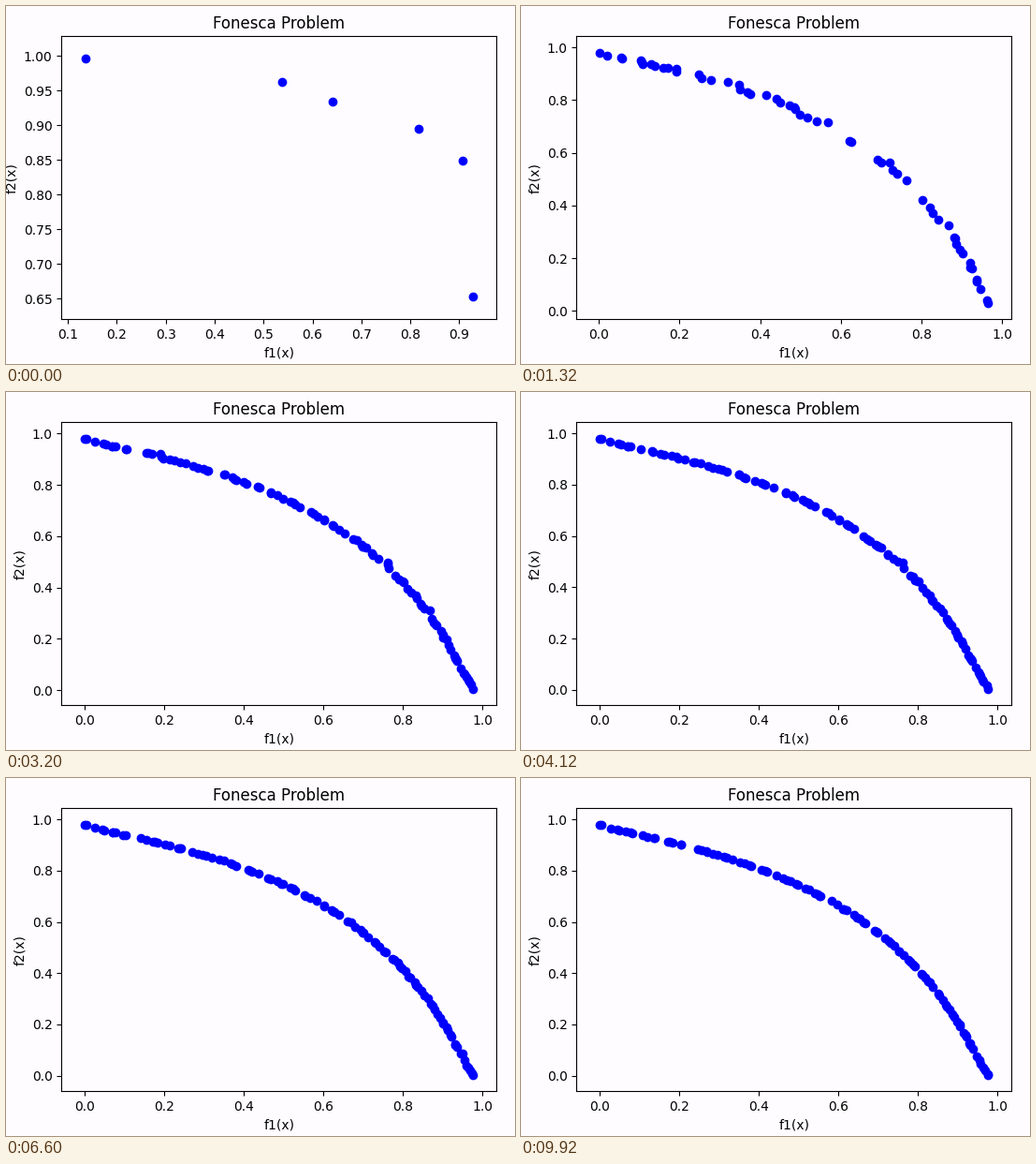
Write a matplotlib script that moves like this. It is 544 by 382 pixels and loops after 10 s.

```python
import numpy as np
import matplotlib.pyplot as plt
from matplotlib.animation import FuncAnimation

W, H, DPI = 544, 382, 100
AX_X, AX_Y, AX_W, AX_H = 59.4, 47.6, 465, 302
TICK_MS, GENERATION_MS, LOOP_MS = 40, 100, 10000
GENERATIONS = LOOP_MS // GENERATION_MS
SLOTS = 98
PAPER = "#fefcff"

# The random first generation, before any selection
FIRST = np.array([(.1364, .9957), (.5378, .9618), (.6416, .9342),
                  (.816, .8954), (.9077, .8488), (.927, .6524)])

rng = np.random.default_rng(7)


def objectives(t, e):
    """t: place along the Pareto set, e: squared distance from it."""
    return np.column_stack([1 - np.exp(-(t - 1) ** 2 - e),
                            1 - np.exp(-(t + 1) ** 2 - e)])


def dominated(p):
    le = (p[:, None] <= p).all(axis=2)
    lt = (p[:, None] < p).any(axis=2)
    return (le & lt).any(axis=0)


def even_places(u):
    """Turn fractions of the front's length into places along it."""
    t = np.linspace(0.97, -0.96, 1000)
    steps = np.hypot(*np.diff(objectives(t, 0), axis=0).T)
    arc = np.concatenate([[0], np.cumsum(steps)])
    return np.interp(u, arc / arc[-1], t)


def population_size(gen):
    left = max(0, 1 - gen / 40)
    return 6 + (SLOTS - 6) * (1 - left ** 2)


def distance(gen):
    return 0.6 * (1 + gen) ** -1.4


def extremes(gen):
    tail = -0.95 + 0.5 * np.exp(-gen / 9)
    return np.array([0.97, tail])


def evolve():
    """Fronts of all generations; beaten and some random members are reborn."""
    fronts = [FIRST]
    order = rng.permutation(SLOTS)
    t, e = np.zeros(SLOTS), np.zeros(SLOTS)
    reborn = np.full(SLOTS, True)
    for gen in range(1, GENERATIONS):
        u = (np.arange(SLOTS) + 0.5 + rng.normal(0, 0.5, SLOTS)) / SLOTS
        t = np.where(reborn, even_places(u), t)
        e = np.where(reborn, rng.exponential(distance(gen), SLOTS), e)

        ends = extremes(gen)
        active = (order < population_size(gen)) & (t > ends[1])
        edge = objectives(ends, 0.15 * distance(gen))
        points = np.vstack([edge, objectives(t[active], e[active])])
        beaten = dominated(points)
        fronts.append(points[~beaten])

        reborn = ~active | (rng.random(SLOTS) < 0.04)
        reborn[active] |= beaten[2:]
    return fronts


FRONTS = evolve()

fig = plt.figure(figsize=(W / DPI, H / DPI), dpi=DPI, facecolor=PAPER)
ax = fig.add_axes((AX_X / W, AX_Y / H, AX_W / W, AX_H / H), facecolor=PAPER)
ax.set_title("Fonesca Problem")
ax.set_xlabel("f1(x)")
ax.set_ylabel("f2(x)")
dots = ax.scatter([], [], c="b")

# Marker radius in axes units, added to the data range before the margin
PAD = 3 * DPI / 72 / np.array([AX_W, AX_H])


def update(i):
    points = FRONTS[i * TICK_MS // GENERATION_MS]
    dots.set_offsets(points)
    lo, hi = points.min(axis=0) - PAD, points.max(axis=0) + PAD
    margin = 0.05 * (hi - lo)
    ax.set_xlim(lo[0] - margin[0], hi[0] + margin[0])
    ax.set_ylim(lo[1] - margin[1], hi[1] + margin[1])
    return [dots]


anim = FuncAnimation(fig, update, frames=LOOP_MS // TICK_MS,
                     interval=TICK_MS, repeat=True, repeat_delay=0)
plt.show()
```
